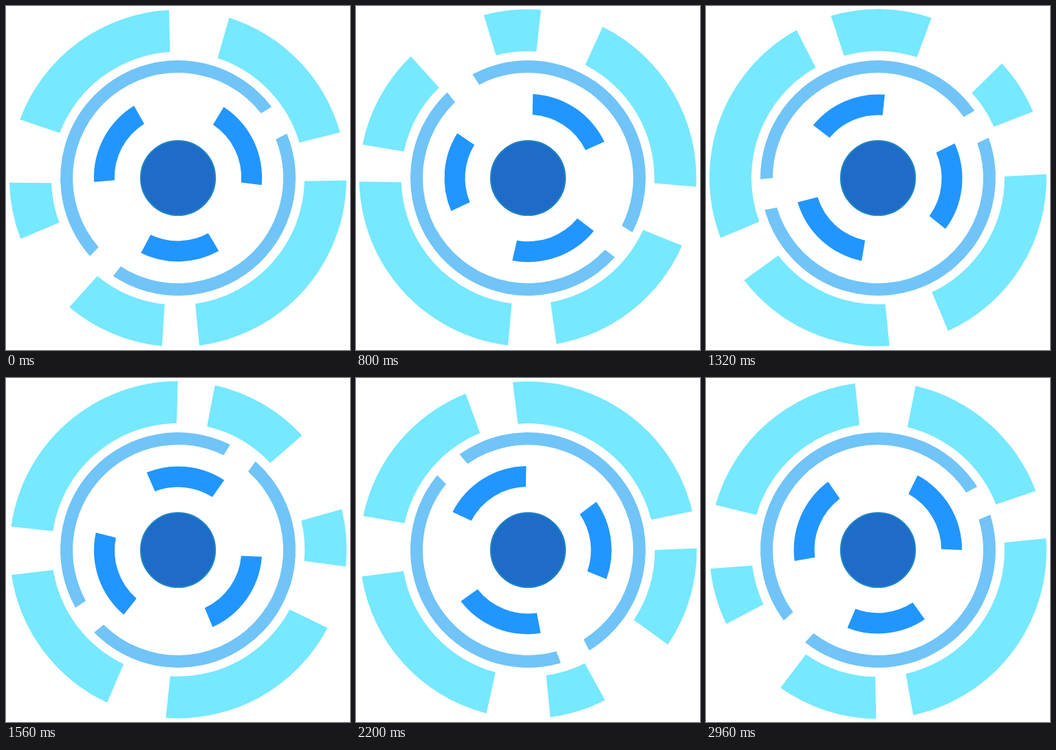
Animation of 500 by 500 pixels, one loop 3000 ms. Source, as an HTML page:

```html
<!DOCTYPE html>
<html lang="en">
<head>
<meta charset="utf-8">
<title>Rotating rings</title>
<style>
  html, body { margin: 0; width: 100%; height: 100%; overflow: hidden; background: #fff; }
  svg { display: block; width: 100vw; height: 100vh; }
</style>
</head>
<body>
<svg id="stage" viewBox="0 0 500 500"></svg>
<script>
const LOOP = 3000, STEP = 40, C = 250;
const FLARE = 0.3; // degrees each end widens outwards
const stage = document.getElementById('stage');

// cuts: start and end of each segment in turn, in degrees clockwise.
// Each ring sits slightly off the pivot (dx, dy), so it wobbles as it turns.
const rings = [
  { inner: 184, outer: 245, dx: -0.15, dy: 0.4, turn: 1, color: '#76e8ff',
    cuts: [1, 82.4, 95.7, 129.8, 159.2, 178.2, 200.7, 266.7, 288, 343.9] },
  { inner: 153, outer: 171, dx: 0, dy: 0, turn: -1, color: '#70c4f7',
    cuts: [138.7, 322.4, 338.1, 483.2] },
  { inner: 92.2, outer: 122.2, dx: -0.1, dy: -0.7, turn: 1, color: '#2196ff',
    cuts: [61.2, 115.8, 177.3, 238.2, 303.3, 364.8] }
];

function add(tag, attrs, parent = stage) {
  const el = document.createElementNS('http://www.w3.org/2000/svg', tag);
  for (const key in attrs) el.setAttribute(key, attrs[key]);
  return parent.appendChild(el);
}

function segmentPath({ inner, outer, dx, dy }, from, to) {
  const point = (r, deg) => {
    const a = deg * Math.PI / 180;
    return `${C + dx + r * Math.cos(a)} ${C + dy + r * Math.sin(a)}`;
  };
  const large = to - from > 180 ? 1 : 0;
  return `M${point(outer, from - FLARE)}` +
    `A${outer} ${outer} 0 ${large} 1 ${point(outer, to + FLARE)}` +
    `L${point(inner, to - FLARE)}` +
    `A${inner} ${inner} 0 ${large} 0 ${point(inner, from + FLARE)}Z`;
}

for (const ring of rings) {
  ring.group = add('g', { fill: ring.color });
  for (let i = 0; i < ring.cuts.length; i += 2) {
    add('path', { d: segmentPath(ring, ring.cuts[i], ring.cuts[i + 1]) }, ring.group);
  }
}
add('circle', { cx: C, cy: C, r: 53.9, fill: '#1e6bc8', stroke: '#1c80c4', 'stroke-width': 2.4 });

function draw(time) {
  const t = Math.floor((time % LOOP) / STEP) * STEP;
  for (const { group, turn } of rings) {
    group.setAttribute('transform', `rotate(${turn * 360 * t / LOOP} ${C} ${C})`);
  }
}

const start = performance.now();
function tick() {
  draw(performance.now() - start);
  requestAnimationFrame(tick);
}
tick();
</script>
</body>
</html>
```
